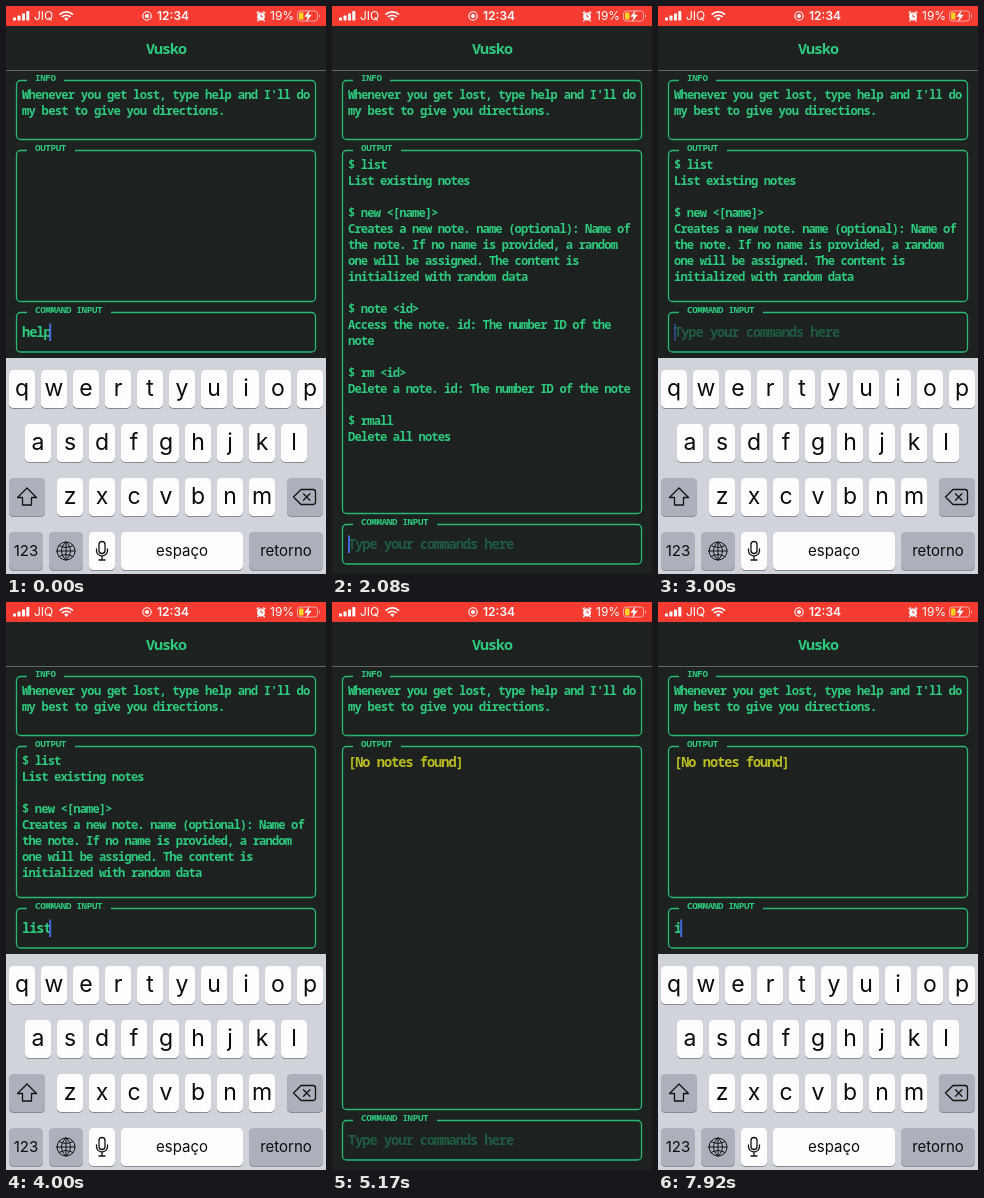
These frames come from a looping animation (320 px wide and 568 px high, 8 s). An HTML page:

```html
<!DOCTYPE html>
<html lang="en">
<head>
<meta charset="utf-8">
<title>Terminal notes</title>
<style>
html, body { margin: 0; width: 100%; height: 100%; overflow: hidden; background: #1d2120; }
svg { display: block; width: 100vw; height: 100vh; }
text { white-space: pre; }
.mono { font-family: "Noto Sans Mono", "DejaVu Sans Mono", monospace; font-weight: 600; fill: #2dcb7d; }
.title { font-size: 15px; letter-spacing: -1px; }
.label { font-size: 9.2px; letter-spacing: -.34px; }
.info { font-size: 12.1px; letter-spacing: -.72px; }
.out { font-size: 12.1px; letter-spacing: -.85px; }
.big { font-size: 13.6px; letter-spacing: -.98px; }
.ui { font-family: Inter, Roboto, sans-serif; }
.key { font-size: 23px; fill: #0b0b0c; text-anchor: middle; }
.small { font-size: 15px; fill: #0b0b0c; text-anchor: middle; }
.frame { fill: none; stroke: #27b971; stroke-width: 1.3; }
.icon { fill: none; stroke: #111214; stroke-width: 1.3; stroke-linejoin: round; stroke-linecap: round; }
.thin { stroke-width: 1; }
.status { fill: #fff; font-size: 12px; }
</style>
</head>
<body>
<svg id="stage" viewBox="0 0 320 568">
  <defs><clipPath id="clip"><rect id="clipBox" x="11" y="146" width="298" height="149"/></clipPath></defs>
  <rect width="320" height="568" fill="#1d2120"/>
  <path d="M0 64.5H320" stroke="#626765"/>
  <text class="mono title" x="140" y="48">Vusko</text>

  <path id="infoFrame" class="frame"/>
  <text class="mono label" x="29" y="75">INFO</text>
  <text class="mono info" x="16" y="93">Whenever you get lost, type help and I'll do</text>
  <text class="mono info" x="16" y="109">my best to give you directions.</text>

  <path id="outFrame" class="frame"/>
  <text class="mono label" x="29" y="145">OUTPUT</text>
  <g clip-path="url(#clip)">
    <g id="help"></g>
    <text id="none" class="mono big" x="16" y="164.5" style="fill:#b9bb1e">[No notes found]</text>
  </g>

  <g id="input">
    <path id="inFrame" class="frame"/>
    <text class="mono label" x="29" y="307">COMMAND INPUT</text>
    <text id="hint" class="mono big" x="16" y="331.2" style="fill:#1f5a41">Type your commands here</text>
    <text id="typed" class="mono big" x="16" y="331.2"></text>
    <rect id="caret" y="317.5" width="2" height="17.5" fill="#4169dc"/>
  </g>

  <g id="board"><rect y="352" width="320" height="220" fill="#d0d3d9"/></g>

  <g class="ui">
    <rect width="320" height="20" fill="#f63b31"/>
    <g fill="#fff">
      <rect x="7" y="11.5" width="3" height="3" rx=".7"/>
      <rect x="11.5" y="9.5" width="3" height="5" rx=".7"/>
      <rect x="16" y="7.5" width="3" height="7" rx=".7"/>
      <rect x="20.3" y="5" width="3" height="9.5" rx=".7"/>
      <path d="M60.3 15l2.2-2.4a3.2 3.2 0 0 0-4.4 0z"/>
      <circle cx="141" cy="10" r="2.1"/>
      <circle cx="255" cy="10.5" r="3.9"/>
    </g>
    <text class="status" x="28" y="14.4">JIQ</text>
    <g fill="none" stroke="#fff">
      <path d="M53.6 8.6a9.6 9.6 0 0 1 13.4 0M55.9 11a6.4 6.4 0 0 1 8.8 0" stroke-width="1.7"/>
      <circle cx="141" cy="10" r="4.2" stroke-width="1.1"/>
      <path d="M250.8 7.3l2-1.8M259.2 7.3l-2-1.8M252.4 14l-1 1.2M257.6 14l1 1.2" stroke-width="1.4"/>
    </g>
    <path d="M255 8.2V10.8H257" fill="none" stroke="#f63b31" stroke-width=".9"/>
    <text class="status" x="151" y="14.4" font-weight="600">12:34</text>
    <text class="status" x="264" y="14.4">19%</text>
    <rect x="291.5" y="5" width="20" height="10" rx="2.8" fill="none" stroke="#fff" stroke-opacity=".55"/>
    <path d="M313 8.3a2 2 0 0 1 0 3.4z" fill="#fff" fill-opacity=".6"/>
    <rect x="293" y="6.5" width="4.5" height="7" rx="1.2" fill="#ffd426"/>
    <path d="M303.6 4l-5.2 6.8h3.2l-1.5 5.2 5.6-7.2h-3.4z" fill="#fff"/>
  </g>
</svg>
<script>
const LOOP = 8000, SHIFT = 212, BOARD = 216;
const $ = id => document.getElementById(id);

function add(parent, tag, attrs, text) {
  const el = document.createElementNS("http://www.w3.org/2000/svg", tag);
  for (const k in attrs) el.setAttribute(k, attrs[k]);
  if (text) el.textContent = text;
  parent.appendChild(el);
  return el;
}

// Rounded box whose top edge leaves a gap for its label
const framePath = (top, bottom, gapEnd) =>
  `M${gapEnd} ${top}H305.5a4 4 0 0 1 4 4V${bottom - 4}a4 4 0 0 1-4 4H14.5a4 4 0 0 1-4-4V${top + 4}a4 4 0 0 1 4-4H21`;

$("infoFrame").setAttribute("d", framePath(74.5, 133.5, 58));
$("inFrame").setAttribute("d", framePath(306.5, 346, 105));

`$ list
List existing notes

$ new <[name]>
Creates a new note. name (optional): Name of
the note. If no name is provided, a random
one will be assigned. The content is
initialized with random data

$ note <id>
Access the note. id: The number ID of the
note

$ rm <id>
Delete a note. id: The number ID of the note

$ rmall
Delete all notes`.split("\n").forEach((line, i) =>
  add($("help"), "text", { class: "mono out", x: 16, y: 163 + 16 * i }, line));

// Keyboard
const board = $("board");
function key(x, y, w, label, dark, cls = "small") {
  const box = { x, width: w, height: 38, rx: 4.6 };
  add(board, "rect", { ...box, y: y + 1, fill: "#888b91" });
  add(board, "rect", { ...box, y, fill: dark ? "#abb0ba" : "#fdfdfe" });
  const base = y + (cls === "key" ? 26 : 24);
  if (label) add(board, "text", { class: "ui " + cls, x: x + w / 2, y: base }, label);
}
["qwertyuiop", "asdfghjkl", "zxcvbnm"].forEach((row, r) =>
  [...row].forEach((c, i) => key([3, 19, 51][r] + 32 * i, 364 + 54 * r, 26, c, false, "key")));
key(3, 472, 36, "", true);
key(281, 472, 36, "", true);
key(3, 526, 34, "123", true);
key(43, 526, 34, "", true);
key(83, 526, 26, "");
key(115, 526, 122, "espaço");
key(243, 526, 74, "retorno", true);

const icon = (d, cls = "") => add(board, "path", { class: "icon " + cls, d });
icon("M21 482l9.5 9.5h-5V499h-9v-7.5h-5z");
icon("M295 483.5h12a2.5 2.5 0 0 1 2.5 2.5v10a2.5 2.5 0 0 1-2.5 2.5h-12l-7.5-7.5zM297.5 487.8l6.4 6.4M303.9 487.8l-6.4 6.4");
icon("M51 545a9 9 0 1 0 18 0a9 9 0 1 0-18 0zM60 536v18M51 545h18M60 536c-6 5-6 13 0 18M60 536c6 5 6 13 0 18M53 539.5q7 4 14 0M53 550.5q7-4 14 0", "thin");
icon("M96 535.5a3 3 0 0 1 3 3v6a3 3 0 0 1-6 0v-6a3 3 0 0 1 3-3zM90.5 543v1.5a5.5 5.5 0 0 0 11 0V543M96 550v4M93 554h6");

// [time, typed text, caret shown]
const edits = [
  [-300, "help", true], [690, "", false], [2050, "", true],
  [3180, "l", true], [3400, "li", true], [3600, "lis", true], [3800, "list", true],
  [4440, "", false], [5880, "", true], [7860, "i", true]
];
// [time, keyboard raised]
const moves = [[-2000, 1], [690, 0], [2240, 1], [4440, 0], [6070, 1]];

const latest = (list, t) => list.filter(e => e[0] <= t).pop();
const clamp = v => Math.max(0, Math.min(1, v));

// Critically damped spring, 0 to 1
const spring = ms => 1 - (1 + .018 * ms) * Math.exp(-.018 * ms);

function blink(ms) {
  const p = ms % 1050;
  return p < 800 ? clamp((620 - p) / 160) : clamp((p - 850) / 200);
}

const show = (id, on) => $(id).setAttribute("visibility", on ? "visible" : "hidden");

function draw(t) {
  const [moved, up] = latest(moves, t);
  const s = spring(t - moved);
  const down = up ? 1 - s : s;
  const bottom = 295.5 + SHIFT * down;
  $("outFrame").setAttribute("d", framePath(144.5, bottom, 69));
  $("clipBox").setAttribute("height", bottom - 146.5);
  $("input").setAttribute("transform", `translate(0 ${SHIFT * down})`);
  board.setAttribute("transform", `translate(0 ${BOARD * down})`);

  const [edited, text, focus] = latest(edits, t);
  $("typed").textContent = text;
  show("hint", !text);
  $("caret").setAttribute("x", 16 + 7 * text.length - (text ? .8 : 0));
  $("caret").setAttribute("opacity", focus ? blink(t - edited) : 0);

  show("help", t >= 690 && t < 4440);
  show("none", t >= 4440);
}

const start = performance.now();
function tick() {
  draw((performance.now() - start) % LOOP);
  requestAnimationFrame(tick);
}
tick();
</script>
</body>
</html>
```
